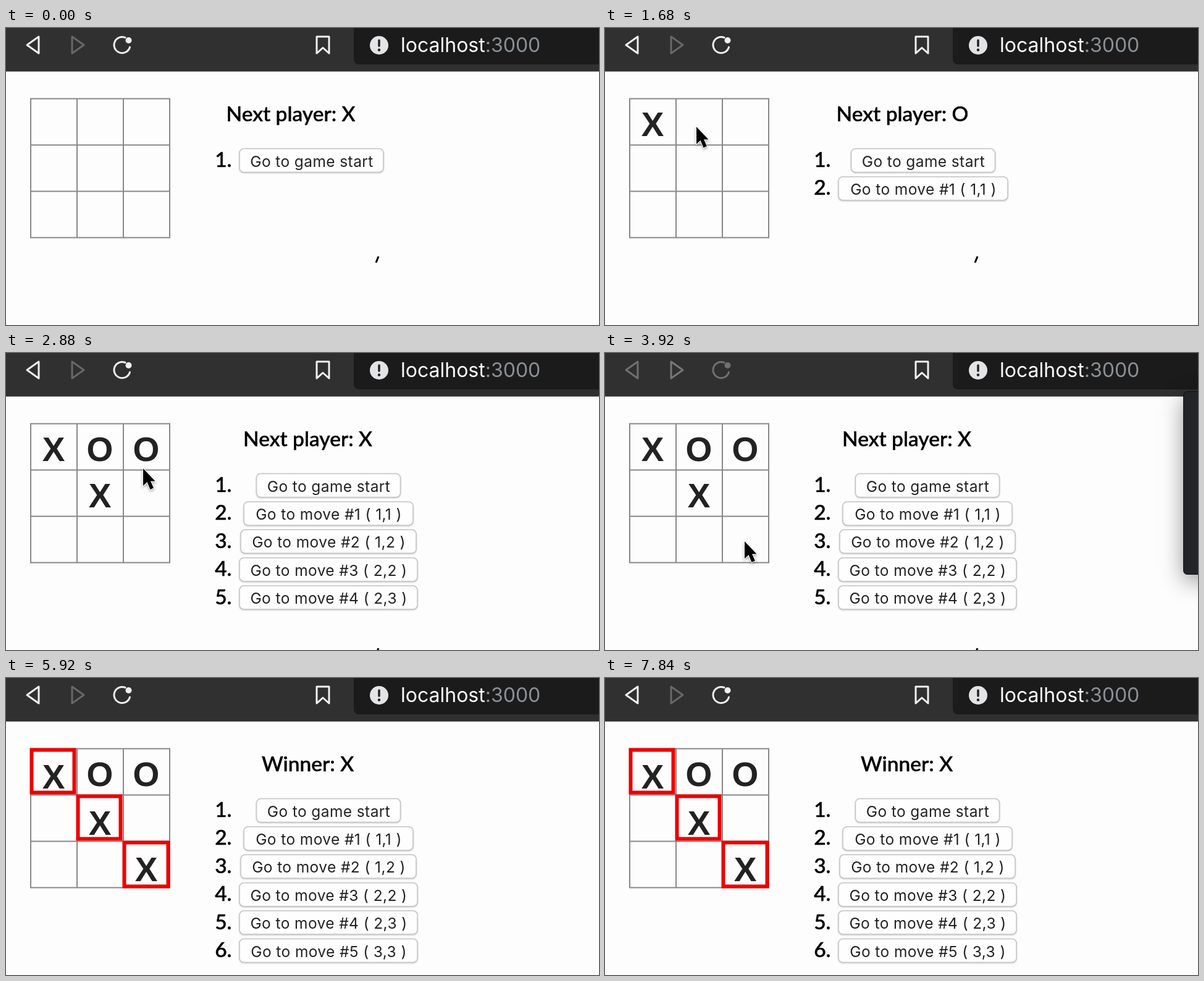
Animation of 960x481 px, one loop 7.92 s. Source, as an HTML page:

```html
<!DOCTYPE html>
<html lang="en">
<meta charset="utf-8">
<title>Tic-tac-toe</title>
<style>
html, body { margin: 0; height: 100%; overflow: hidden; background: #fdfdfd }
svg { display: block; width: 960px; height: 481px }
.head { font: 500 33.5px Lato, sans-serif; stroke: #000; stroke-width: .5px }
.label { font: 24.5px Inter, sans-serif; letter-spacing: .4px; fill: #222 }
.mark { font: bold 55px "Liberation Sans", Arial, sans-serif; fill: #222 }
.url { font: 32px Inter, sans-serif; fill: #fff }
.mid { text-anchor: middle }
.end { text-anchor: end }
.icon { fill: none; stroke-width: 3; stroke-linejoin: round; stroke-linecap: round }
.button { fill: #fefefe; stroke: #c4c4c4; stroke-width: 1.5; filter: drop-shadow(0 1px 1px #0003) }
.popup { fill: #222427; stroke: #111; filter: drop-shadow(0 10px 18px #0006) }
</style>
<svg id="stage" viewBox="0 0 960 481"></svg>
<script>
const LOOP = 7920, STEP = 80;
const stage = document.getElementById('stage');
// time, column, row, button label
const moves = [
  [1040, 0, 0, '1,1'], [1760, 1, 0, '1,2'], [2160, 1, 1, '2,2'],
  [2720, 2, 0, '2,3'], [5040, 2, 2, '3,3']
];
const widths = [233, 274, 284, 288, 288, 288];
const centers = [494.5, 515, 520, 522, 522, 522];
// time, x, y of the pointer tip
const paths = [
  [[80, 301, 330], [160, 252, 266], [240, 185, 230], [320, 125, 195], [480, 72, 163],
   [1280, 70, 161], [1600, 148, 160], [1840, 148, 160], [2080, 145, 226], [2240, 145, 226],
   [2560, 222, 187], [3280, 222, 187], [3520, 226, 305], [4080, 226, 305]],
  [[6240, 640, 155], [6320, 880, 235], [6400, 958, 262]]
];

const text = (cls, x, y, s) => `<text class="${cls}" x="${x}" y="${y}">${s}</text>`;
const icon = (d, color) => `<path class="icon" stroke="${color}" d="${d}"/>`;

function toolbar(active) {
  const on = active ? '#f0f0f0' : '#707070', off = active ? '#686868' : '#777';
  return `<rect width="960" height="70.5" fill="#303030"/>
    <rect x="563" y="-10" width="420" height="69" rx="8" fill="#1b1b1b"/>` +
    icon('M34 27.5L53 14V41Z', on) + icon('M126 27.5L107 14V41Z', off) +
    icon('M193 15.5A13 13 0 1 0 200.5 31', on) +
    `<circle cx="198.5" cy="20" r="5" fill="${on}"/>` +
    icon('M503 14H523V41L513 32L503 41Z', '#f0f0f0') +
    `<circle cx="604" cy="28" r="15" fill="#e4e4e6"/>
    <path d="M604 20V29" stroke="#222" stroke-width="3.5" stroke-linecap="round"/>
    <circle cx="604" cy="35.5" r="2.2" fill="#222"/>` +
    text('url', 639, 39, 'localhost<tspan fill="#8b9096">:3000</tspan>');
}

function board(played, won) {
  let s = '<path fill="none" stroke="#888" stroke-width="2" d="';
  for (let i = 0; i < 4; i++) s += `M${40 + 75 * i} 114V340M39 ${114.5 + 75 * i}H266`;
  s += '"/>';
  played.forEach(([, col, row], i) => {
    const win = won && i % 2 === 0, x = 75 * col, y = 75 * row;
    if (win) s += `<rect x="${41.5 + x}" y="${116.5 + y}" width="${col === 2 ? 71 : 69}"
      height="${row === 2 ? 71 : 69}" fill="none" stroke="#ee0000" stroke-width="6"/>`;
    s += text('mark mid', 77 + x, (win ? 179 : 175) + y, i % 2 ? 'O' : 'X');
  });
  return s;
}

function history(played, won) {
  const n = played.length, center = centers[n];
  const title = won ? 'Winner: X' : 'Next player: ' + 'XO'[n % 2];
  let s = text('head mid', center - 33.5, 151, title);
  for (let i = 0; i <= n; i++) {
    const y = 45.4 * i, w = widths[i];
    s += text('head end', 365.5, 225 + y, i + 1 + '.') +
      `<rect class="button" x="${center - w / 2}" y="${195.5 + y}" width="${w}" height="38" rx="7"/>` +
      text('label mid', center + .5, 224.5 + y,
        i ? `Go to move #${i} ( ${moves[i - 1][3]} )` : 'Go to game start');
  }
  const y = Math.max(375, 301.5 + 45.4 * n - 45.4 + 45.4);
  return s + `<path d="M603 ${y - 5}L599 ${y + 5}" stroke="#000" stroke-width="3"/>`;
}

function pointer(t) {
  const path = paths.find(p => t >= p[0][0] && t < p[p.length - 1][0]);
  if (!path) return '';
  const i = path.findIndex(p => p[0] > t);
  const [t0, x0, y0] = path[i - 1], [t1, x1, y1] = path[i];
  const k = (t - t0) / (t1 - t0);
  return `<path transform="translate(${x0 + (x1 - x0) * k} ${y0 + (y1 - y0) * k})"
    d="M0 0V28L6.5 22L11.5 34L17 31.5L12 20.5H19.5Z" stroke="#fff" stroke-width="2"
    paint-order="stroke" style="filter:drop-shadow(0 2px 2px #0005)"/>`;
}

let last = -1;
function draw(now) {
  const t = Math.floor(now % LOOP / STEP) * STEP;
  if (t !== last) {
    last = t;
    const played = moves.filter(m => t >= m[0]);
    const won = played.length === moves.length;
    const away = t >= 3840 && t < 4960;
    stage.innerHTML = toolbar(!away) + board(played, won) + history(played, won) +
      (away ? '<rect class="popup" x="936.5" y="62.5" width="60" height="296" rx="6"/>' : '') +
      pointer(t);
  }
  requestAnimationFrame(() => draw(performance.now() - start));
}
const start = performance.now();
draw(0);
</script>
</html>
```
